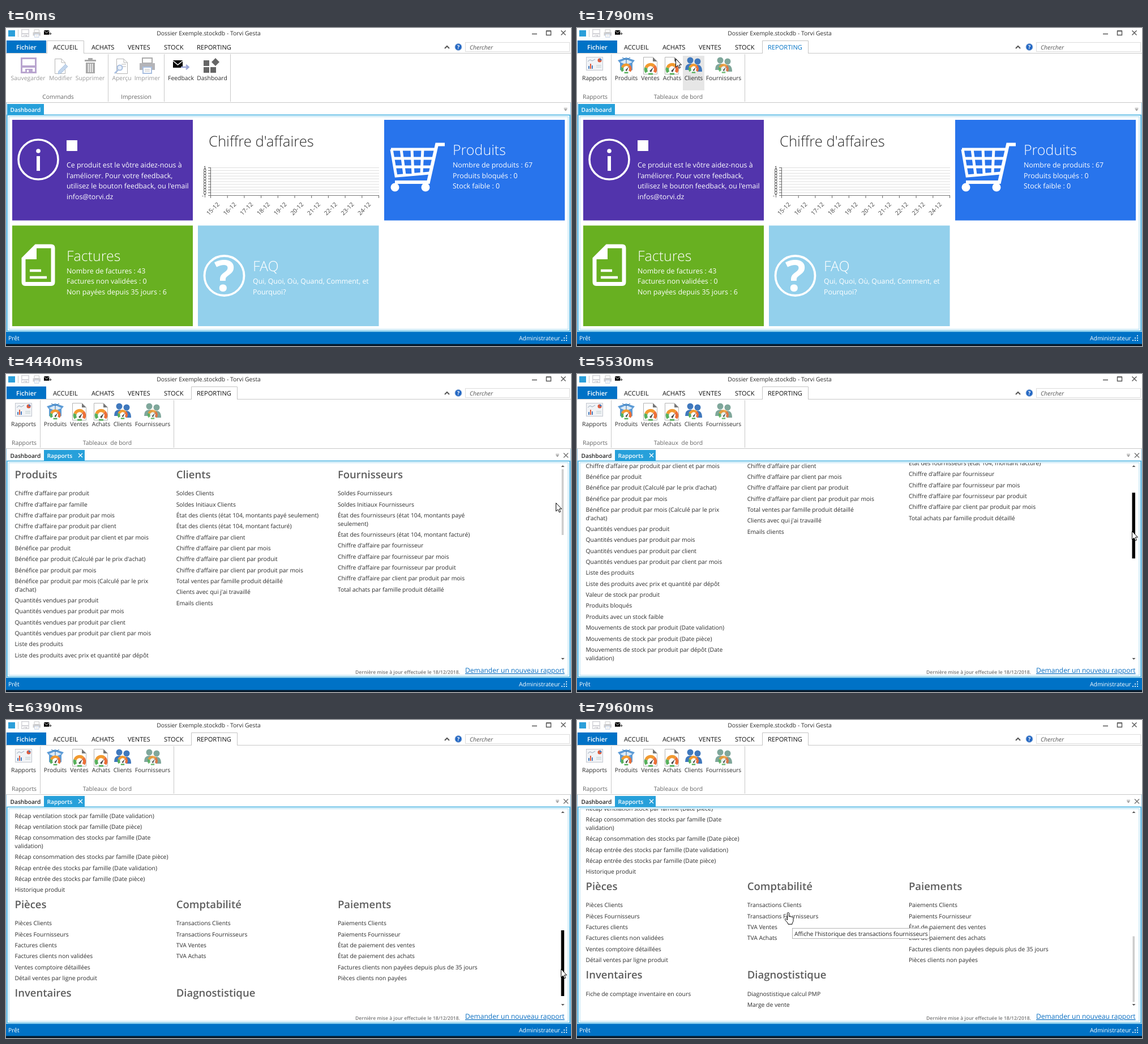
Recreate the animation shown at these times as an HTML page. Size 998 px wide and 561 px high, loop 8000 ms.

```html
<!DOCTYPE html>
<html lang="fr">
<head>
<meta charset="utf-8">
<title>Gestion de stock</title>
<style>
html, body { margin: 0; width: 100%; height: 100%; overflow: hidden; background: #fff; }
svg { display: block; width: 100%; height: 100%; }
text { font: 10.4px "Open Sans", "Noto Sans", sans-serif; fill: #2c2c2c; text-rendering: geometricPrecision; white-space: pre; }
.mid text, text.mid { text-anchor: middle; }
.tabs text { font-size: 11.1px; fill: #111; }
.dim text { fill: #989898; }
text.group { fill: #666; }
text.doc { font-weight: 600; font-size: 10.2px; }
.tile text { font-size: 12.4px; fill: #fff; }
.tile text.big, text.big { font-size: 25px; font-weight: 300; }
text.head { font-size: 18.5px; font-weight: 600; fill: #5e5e5e; }
#report text.item { font-size: 10.35px; }
.line { fill: none; stroke: #c9c9c9; }
</style>
</head>
<body>
<svg viewBox="0 0 998 561" preserveAspectRatio="none">
<defs>
  <clipPath id="view"><rect x="6" y="157" width="968" height="352"/></clipPath>
  <g id="gauge">
    <circle r="9" fill="#fff"/>
    <g fill="none" stroke-width="5.500">
      <path d="M-7 5A8.500 8.500 0 0 1 -8 -3" stroke="#58b05c"/>
      <path d="M-8 -3A8.500 8.500 0 0 1 6 -6" stroke="#f29a30"/>
      <path d="M6 -6A8.500 8.500 0 0 1 7 5" stroke="#ec7038"/>
    </g>
    <path d="M-2 3L5 -4L1 5Z" fill="#444"/>
    <path d="M-4 8H4" stroke="#58b05c" stroke-width="3"/>
  </g>
  <g id="page"><path d="M.5 .5H17L24.500 8V30.500H.5Z" fill="#fff" stroke="#b5b5b5"/><path d="M17 .5V8H24.500Z" fill="#777"/></g>
  <g id="people">
    <circle cx="-6" cy="-10" r="5.500"/><circle cx="7" cy="-8" r="5.500"/>
    <path d="M-15 7Q-15 -4 -6 -4T2 7ZM-1 10Q-1 -2 7 -2T15 10Z"/>
  </g>
  <g id="mail"><path d="M0 0H17V13H0Z" fill="#000"/><path d="M0 1L8.500 8L17 1" fill="none" stroke="#fff" stroke-width="1.500"/></g>
  <g id="printer"><path d="M5 0H22V9H5Z" fill="#fff" stroke="#aaa" stroke-width="2"/><path d="M0 9H27V21H0Z" fill="#b4b4b8"/><path d="M6 16H21V27H6Z" fill="#fff" stroke="#a9bfe0" stroke-width="2"/><path d="M9 20H18M9 23H18" stroke="#bbb"/></g>
  <g id="disk"><path d="M1.500 1.500H26.500V26.500H1.500Z" fill="#fff" stroke="currentColor" stroke-width="3"/><path d="M1 14H27V18H1ZM8 20H21V27H8Z" fill="currentColor"/><path d="M11 22H14V26H11Z" fill="#fff"/></g>
</defs>

<rect width="998" height="561" fill="#fff"/>

<!-- title bar -->
<rect x="4" y="4" width="12" height="11" fill="#2b9fd9"/>
<path d="M21.500 3V16" class="line"/>
<use href="#disk" transform="translate(27 2) scale(.5)" color="#d3d3d8"/>
<use href="#printer" transform="translate(47.500 3) scale(.5)" opacity=".65"/>
<use href="#mail" transform="translate(67 4) scale(.55 .6)"/>
<path d="M75 10H80M78 8L80 10L78 12" fill="none" stroke="#222"/>
<text class="mid" x="358" y="13">Dossier Exemple.stockdb - Torvi Gesta</text>
<path d="M929 10.500H938M954.500 5.500H962.500V12.500H954.500ZM954 5H963M980.500 4.500L988.500 12.500M988.500 4.500L980.500 12.500" fill="none" stroke="#555" stroke-width="1.400"/>

<!-- ribbon tabs -->
<path d="M0 44.500H998M0 131.500H998" class="line"/>
<rect x="1" y="22" width="70" height="22" fill="#0072c6"/>
<path id="tabBox" fill="#fff" stroke="#c4c4c4"/>
<g class="tabs">
  <text class="mid" x="36" y="38" style="fill:#fff;font-weight:600">Fichier</text>
  <text x="83" y="38">ACCUEIL</text><text x="151" y="38">ACHATS</text><text x="215" y="38">VENTES</text>
  <text x="279" y="38">STOCK</text><text x="337" y="38" id="reporting">REPORTING</text>
</g>
<path d="M775 36L779 32L783 36" fill="none" stroke="#555" stroke-width="2"/>
<circle cx="799" cy="33.500" r="6" fill="#2468c4" stroke="#9db9dd"/>
<text class="mid" x="799" y="37" style="fill:#fff;font-weight:700;font-size:9.500px">?</text>
<rect x="811.500" y="25.500" width="184" height="16" fill="#fff" stroke="#dcdcdc"/>
<text x="819" y="37.500" style="font-style:italic;fill:#555">Chercher</text>

<!-- home ribbon -->
<g id="homeBar" class="mid">
  <path d="M180.500 46V130M279.500 46V130M396.500 46V130" class="line"/>
  <use href="#disk" x="26" y="52" color="#b9a5cf"/>
  <g fill="none" stroke="#b5b5b5"><path d="M86.500 54.500H98L104.500 61V80.500H86.500Z"/><path d="M98 54.500V61H104.500"/><path d="M93 76L105 64L109 68L97 80L92 81Z" fill="#c3d6ec" stroke="#a9c2e0"/></g>
  <path d="M139 56H159V59H139ZM145 53H153V56H145ZM141 61H157V80H141Z" fill="#a8a8a8"/>
  <path d="M145.500 63V78M149 63V78M152.500 63V78" stroke="#fff" stroke-width="1.500"/>
  <g fill="none" stroke="#b5b5b5"><path d="M195.500 54.500H208L214.500 61V80.500H195.500Z"/><path d="M208 54.500V61H214.500M204 64H212M206 68H212"/><circle cx="201" cy="70" r="4.500" fill="#e8f0fa" stroke="#a9bfe0" stroke-width="2"/><path d="M198 74L192 80" stroke="#a9bfe0" stroke-width="2.500"/></g>
  <use href="#printer" x="236" y="53"/>
  <use href="#mail" x="295" y="57"/>
  <path d="M309 69H322M318 65L322.500 69L318 73" fill="none" stroke="#9ba6d6" stroke-width="2.500"/>
  <path d="M349 57H359V67H349ZM349 69H359V79H349ZM361 69H371V79H361ZM370 53L377 60L370 67L363 60Z" fill="#666"/>
  <g class="dim"><text x="39" y="92">Sauvegarder</text><text x="96.500" y="92">Modifier</text><text x="148.500" y="92">Supprimer</text><text x="204.500" y="92">Aperçu</text><text x="249.500" y="92">Imprimer</text></g>
  <text x="309" y="92">Feedback</text><text x="364" y="92">Dashboard</text>
  <text x="92" y="125" class="group">Commands</text><text x="230" y="125" class="group">Impression</text>
</g>

<!-- reporting ribbon -->
<g id="reportBar" class="mid">
  <path d="M60.500 46V130M296.500 46V130" class="line"/>
  <rect id="hover" y="49" height="61"/>
  <rect x="16.500" y="51.500" width="29" height="23" fill="#f1f3f6" stroke="#c3c7cf"/>
  <path d="M19 59L23 56L27 58L32 55" fill="none" stroke="#9ab"/>
  <circle cx="40" cy="57" r="3.500" fill="#dd5a3c"/><path d="M40 57V53.500A3.500 3.500 0 0 1 43.500 57Z" fill="#4a7fc0"/>
  <path d="M20 67H22V72H20ZM26 66H28V72H26Z" fill="#4a7fc0"/><path d="M23 63H25V72H23Z" fill="#dd5a3c"/><path d="M34 66H43M34 69H43" stroke="#bcc"/>
  <path d="M72 57L87 52L102 57L98 62V74L87 80L76 74V62Z" fill="#5c9bd6"/><path d="M76 60L87 55L98 60L87 65Z" fill="#dcebf8"/><path d="M80 52L87 56L94 52M87 55V64" stroke="#2f6fae" fill="none"/>
  <use href="#gauge" transform="translate(87 72) scale(.85)"/>
  <use href="#page" x="117" y="51"/><use href="#gauge" x="130" y="73"/>
  <use href="#page" x="155" y="51"/><use href="#gauge" x="168" y="73"/>
  <use href="#people" x="206" y="67" fill="#3f78bd"/><use href="#gauge" transform="translate(206 72) scale(.8)"/>
  <use href="#people" x="259" y="67" fill="#7fa79b"/><use href="#gauge" transform="translate(259 72) scale(.8)" opacity=".85"/>
  <text x="31" y="92">Rapports</text><text x="87" y="92">Produits</text><text x="129.500" y="92">Ventes</text><text x="168" y="92">Achats</text><text x="206" y="92">Clients</text><text x="259" y="92">Fournisseurs</text>
  <text x="32" y="125" class="group">Rapports</text><text x="179" y="125" class="group">Tableaux  de bord</text>
</g>

<!-- document frame -->
<path id="docTab" fill="#27a0da"/>
<text class="doc" x="7.500" y="148" id="dashTab">Dashboard</text>
<path id="menu" d="M-3 -1H3L0 2.500ZM-3 -3H3V-2H-3Z" fill="#999"/>
<rect x="2" y="153.500" width="994" height="381" fill="none" stroke="#37abdf" stroke-width="1.500"/>
<rect x="5" y="156.500" width="988" height="375" fill="none" stroke="#a5daf1"/>
<path d="M.5 132V536M997.500 132V536" stroke="#8fc4e6"/>

<!-- dashboard -->
<g id="dashboard">
  <g class="tile">
    <rect x="11" y="162" width="319" height="177.500" fill="#5234ac"/>
    <circle cx="57" cy="232" r="35" fill="none" stroke="#fff" stroke-width="3.500"/>
    <path d="M54 226H60V252H54Z" fill="#fff"/><circle cx="57" cy="217" r="3.800" fill="#fff"/>
    <rect x="107" y="198" width="19" height="19" fill="#fff"/>
    <text x="107" y="246">Ce produit est le vôtre aidez-nous à</text><text x="107" y="264.500">l'améliorer. Pour votre feedback,</text>
    <text x="107" y="283">utilisez le bouton feedback, ou l'email</text><text x="107" y="301.500">infos@torvi.dz</text>

    <rect x="668" y="162" width="319" height="177.500" fill="#2874ec"/>
    <path d="M680 214H757M684 230H753M687 245H750M681 214L689 261L748 256M698 214L704 259M717 214L719 258M736 214L734 256" fill="none" stroke="#fff" stroke-width="5"/>
    <path d="M775 205.500H761L746 272H687" fill="none" stroke="#fff" stroke-width="6"/>
    <circle cx="687" cy="281" r="7.500" fill="#fff"/><circle cx="741" cy="281" r="7.500" fill="#fff"/>
    <text class="big" x="789" y="223.500">Produits</text>
    <text x="789" y="246">Nombre de produits : 67</text><text x="789" y="264.500">Produits bloqués : 0</text><text x="789" y="283">Stock faible : 0</text>

    <rect x="11" y="348.500" width="319" height="177.500" fill="#68b021"/>
    <path d="M53 385H80Q83 385 83 388V448Q83 451.500 80 451.500H34Q31 451.500 31 448V407Z" fill="none" stroke="#fff" stroke-width="7"/>
    <path d="M28 408L54 382V408Z" fill="#fff"/><path d="M42 428H62M42 440H72" stroke="#fff" stroke-width="4.500"/>
    <text class="big" x="107" y="410.500">Factures</text>
    <text x="107" y="432.500">Nombre de factures : 43</text><text x="107" y="451">Factures non validées : 0</text><text x="107" y="469.500">Non payées depuis 35 jours : 6</text>

    <rect x="339" y="348.500" width="319.500" height="177.500" fill="#93d0ec"/>
    <circle cx="385.500" cy="437" r="35" fill="none" stroke="#fff" stroke-width="3.800"/>
    <text class="mid" x="386" y="464" style="font-size:76px;font-weight:700">?</text>
    <text class="big" x="436" y="428.500">FAQ</text>
    <text x="436" y="451">Qui, Quoi, Où, Quand, Comment, et</text><text x="436" y="469.500">Pourquoi?</text>
  </g>
  <text class="big" x="358" y="209" style="font-size:25.700px">Chiffre d'affaires</text>
  <g id="chart"></g>
</g>

<!-- reports -->
<g id="reports">
  <text class="doc" x="72.500" y="148" style="fill:#fff">Rapports</text>
  <path d="M128 140L135 147M135 140L128 147" stroke="#fff" stroke-width="1.200"/>
  <path d="M985 139.500L993 147.500M993 139.500L985 147.500" stroke="#777" stroke-width="1.500"/>
  <g clip-path="url(#view)"><g id="report"></g></g>
  <path d="M980.500 164L983.500 161L986.500 164ZM980.500 501L983.500 504L986.500 501Z" fill="#555"/>
  <rect id="thumb" height="116"/>
  <text x="617" y="528.500" style="font-size:8.550px;font-weight:600;fill:#777">Dernière mise à jour effectuée le 18/12/2018.</text>
  <text x="811" y="527" style="font-size:12.050px;fill:#0a6fc2;text-decoration:underline">Demander un nouveau rapport</text>
</g>

<!-- status bar -->
<rect y="536" width="998" height="22" fill="#0072c6"/><rect y="557.500" width="998" height="4" fill="#06192b"/>
<text x="4" y="551" style="fill:#fff">Prêt</text><text x="906" y="551" style="fill:#fff">Administrateur</text>
<path d="M989 542h2v2h-2zM989 546h2v2h-2zM989 550h2v2h-2zM985 546h2v2h-2zM985 550h2v2h-2zM981 550h2v2h-2z" fill="#cfe5f6"/>

<g id="tip"><rect x="380.500" y="367.500" width="242" height="18" fill="#fff" stroke="#b5b5b5"/><text x="384" y="381" style="fill:#222">Affiche l'historique des transactions fournisseurs</text></g>
<path id="cursor" fill="#fff" stroke="#000" stroke-linejoin="round"/>
</svg>

<script>
const $ = id => document.getElementById(id);
const set = (el, attrs) => { for (const k in attrs) el.setAttribute(k, attrs[k]); return el; };
const add = (parent, tag, attrs, str = '') => {
  const el = set(document.createElementNS('http://www.w3.org/2000/svg', tag), attrs);
  el.textContent = str;
  return parent.appendChild(el);
};
const show = (id, on) => { $(id).style.display = on ? '' : 'none'; };

// sales chart: empty series over ten days
const chart = $('chart');
for (let i = 0; i <= 10; i++) {
  const y = 246.5 + i * 4.9, x = 361.5 + i * 29.7;
  add(chart, 'path', { d: `M362 ${y}H659`, stroke: i < 10 ? '#dedede' : '#777' });
  add(chart, 'path', { d: `M357 ${y}H361M${x} 295V300`, stroke: '#666' });
  add(chart, 'text', { x: 354, y: y + 3, 'text-anchor': 'end', style: 'font-size:9px' }, i ? (i < 10 ? '0' : '-1') : '1');
  if (i < 10) add(chart, 'text', { class: 'mid', transform: `translate(${x + 6.5} 321.500) rotate(-45)`, style: 'fill:#444' }, `${15 + i}-12`);
}
add(chart, 'path', { d: 'M361.500 246V295', stroke: '#666' });

// report list: "|" breaks a line, the first entry is the heading
const ca = "Chiffre d'affaire par ", qv = 'Quantités vendues par produit', bp = 'Bénéfice par produit',
  mv = 'Mouvements de stock par produit', mj = 'Mouvements journaliers de stock par produit et dépôt|',
  rv = 'Récap ventilation stock par famille', rc = 'Récap consommation des stocks par famille',
  re = 'Récap entrée des stocks par famille', val = ' (Date validation)', pie = ' (Date pièce)';
const sections = [
  [177, [
    ['Produits', ca + 'produit', ca + 'famille', ca + 'produit par mois', ca + 'produit par client', ca + 'produit par client et par mois',
      bp, bp + " (Calculé par le prix d'achat)", bp + ' par mois', bp + " par mois (Calculé par le prix|d'achat)",
      qv, qv + ' par mois', qv + ' par client', qv + ' par client par mois',
      'Liste des produits', 'Liste des produits avec prix et quantité par dépôt', 'Valeur de stock par produit',
      'Produits bloqués', 'Produits avec un stock faible', mv + val, mv + pie,
      mv + ' par dépôt (Date|validation)', mv + ' par dépôt (Date|pièce)', 'Mouvements manuels de stock',
      mj + '(Date validation)', mj + '(Date pièce)', 'Mouvements détaillés de stock',
      rv + val, rv + pie, rc + ' (Date|validation)', rc + pie, re + val, re + pie, 'Historique produit'],
    ['Clients', 'Soldes Clients', 'Soldes Initiaux Clients', 'État des clients (état 104, montants payé seulement)',
      'État des clients (état 104, montant facturé)', ca + 'client', ca + 'client par mois', ca + 'client par produit',
      ca + 'client par produit par mois', 'Total ventes par famille produit détaillé', "Clients avec qui j'ai travaillé", 'Emails clients'],
    ['Fournisseurs', 'Soldes Fournisseurs', 'Soldes Initiaux Fournisseurs', 'État des fournisseurs (état 104, montants payé|seulement)',
      'État des fournisseurs (état 104, montant facturé)', ca + 'fournisseur', ca + 'fournisseur par mois',
      ca + 'fournisseur par produit', ca + 'client par produit par mois', 'Total achats par famille produit détaillé']]],
  [943, [
    ['Pièces', 'Pièces Clients', 'Pièces Fournisseurs', 'Factures clients', 'Factures clients non validées', 'Ventes comptoire détaillées', 'Détail ventes par ligne produit'],
    ['Comptabilité', 'Transactions Clients', 'Transactions Fournisseurs', 'TVA Ventes', 'TVA Achats'],
    ['Paiements', 'Paiements Clients', 'Paiements Fournisseur', 'État de paiement des ventes', 'État de paiement des achats',
      'Factures clients non payées depuis plus de 35 jours', 'Pièces clients non payées']]],
  [1099.5, [
    ['Inventaires', 'Fiche de comptage inventaire en cours'],
    ['Diagnostistique', 'Diagnostistique calcul PMP', 'Marge de vente']]]
];
for (const [top, cols] of sections) cols.forEach(([head, ...items], c) => {
  const x = 15.5 + c * 285.2;
  let y = top + 37.2;
  add($('report'), 'text', { x, y: top + 6.8, class: 'head' }, head);
  for (const item of items) {
    item.split('|').forEach((line, i) => add($('report'), 'text', { x, y: y += i * 14.65, class: 'item' }, line));
    y += 19.35;
  }
});

// time, pointer x, pointer y, scroll offset
const keys = [
  [0, -40, -40, 0], [289, -40, -40, 0], [290, 620, 455, 0], [910, 372, 34, 0], [1460, 372, 34, 0],
  [1790, 174, 54, 0], [2340, 41, 83, 0], [3200, 41, 83, 0], [3440, 300, 38, 0], [3750, 986, 248, 0],
  [3910, 975, 227, 0], [4360, 975, 227, 0], [4440, 971, 227, 0], [4740, 971, 227, 0], [4900, 982, 235, 0],
  [5370, 982, 235, 0], [5530, 980, 277, 126], [5980, 976, 373, 428], [6240, 979, 422, 570],
  [6390, 980, 439, 618], [6610, 982, 468, 650], [7030, 985, 525, 650], [7090, 985, 525, 650], [7770, 366, 339, 650]
];
// the pointer is sampled about every 80 ms, so it moves in steps
function at(t) {
  const i = keys.findLastIndex(k => k[0] <= Math.max(t, 0)), a = keys[i], b = keys[i + 1] || a;
  const span = b[0] - a[0] || 1, n = Math.max(1, Math.round(span / 80));
  const f = Math.floor((t - a[0]) / span * n) / n;
  return a.map((v, j) => v + (b[j] - v) * f);
}

const buttons = [[6, 56], [66, 109], [110, 149], [150, 186], [187, 225], [226, 292]];
const arrow = 'M.5 .5V15L4 12L6.300 17L8.500 16L6.300 11H10.500Z';
const hand = 'M5.500 2c0-2 3-2 3 0v6c1-1 2.500-.8 2.700 .3 1-.8 2.400-.4 2.600 .6 1.200-.6 2.200 .1 2.200 1.400v5c0 2-2 3-2 6h-7c0-3-5-6-5.500-8-.3-1.700 1.700-2.200 3-.6l1 1.200z';

function draw(now) {
  const t = now % 8000, reporting = t >= 1380, open = t >= 2880;
  const [, x, y, scroll] = at(t);
  show('homeBar', !reporting);
  show('reportBar', reporting);
  show('dashboard', !open);
  show('reports', open);
  show('tip', t >= 7960);

  set($('tabBox'), { d: reporting ? 'M327.500 45V22.500H408.500V45' : 'M72.500 45V22.500H137.500V45' });
  $('reporting').style.fill = t >= 880 && t < 1870 ? '#0072c6' : '#111';
  set($('docTab'), { d: open ? 'M67 134H139V153H67Z' : 'M2 134H67V153H2Z' });
  $('dashTab').style.fill = open ? '#222' : '#fff';
  set($('menu'), { transform: `translate(${open ? 974 : 988.5} 144)` });

  const [, hx, hy] = at(t - 80); // hover lags one step
  const over = hy >= 49 && hy <= 110 && buttons.find(([l, r]) => hx >= l && hx <= r);
  const [l, r] = over || [0, 0];
  set($('hover'), { x: l, width: r - l, fill: t >= 2580 && t < 2880 ? '#d2d2d2' : '#e6e6e6' });

  const held = t >= 5300 && t < 7170, wide = t >= 4820 && t < 7170;
  set($('report'), { transform: `translate(0 ${-scroll})` });
  set($('thumb'), {
    x: wide ? 980.5 : 981.5, width: wide ? 5.5 : 3.5, y: 168 + scroll * .3285,
    fill: held ? '#000' : wide ? '#8a8a8a' : '#cdcdcd'
  });
  set($('cursor'), { d: t >= 7770 ? hand : arrow, transform: `translate(${x} ${y})` });
  requestAnimationFrame(draw);
}
draw(0);
</script>
</body>
</html>
```
